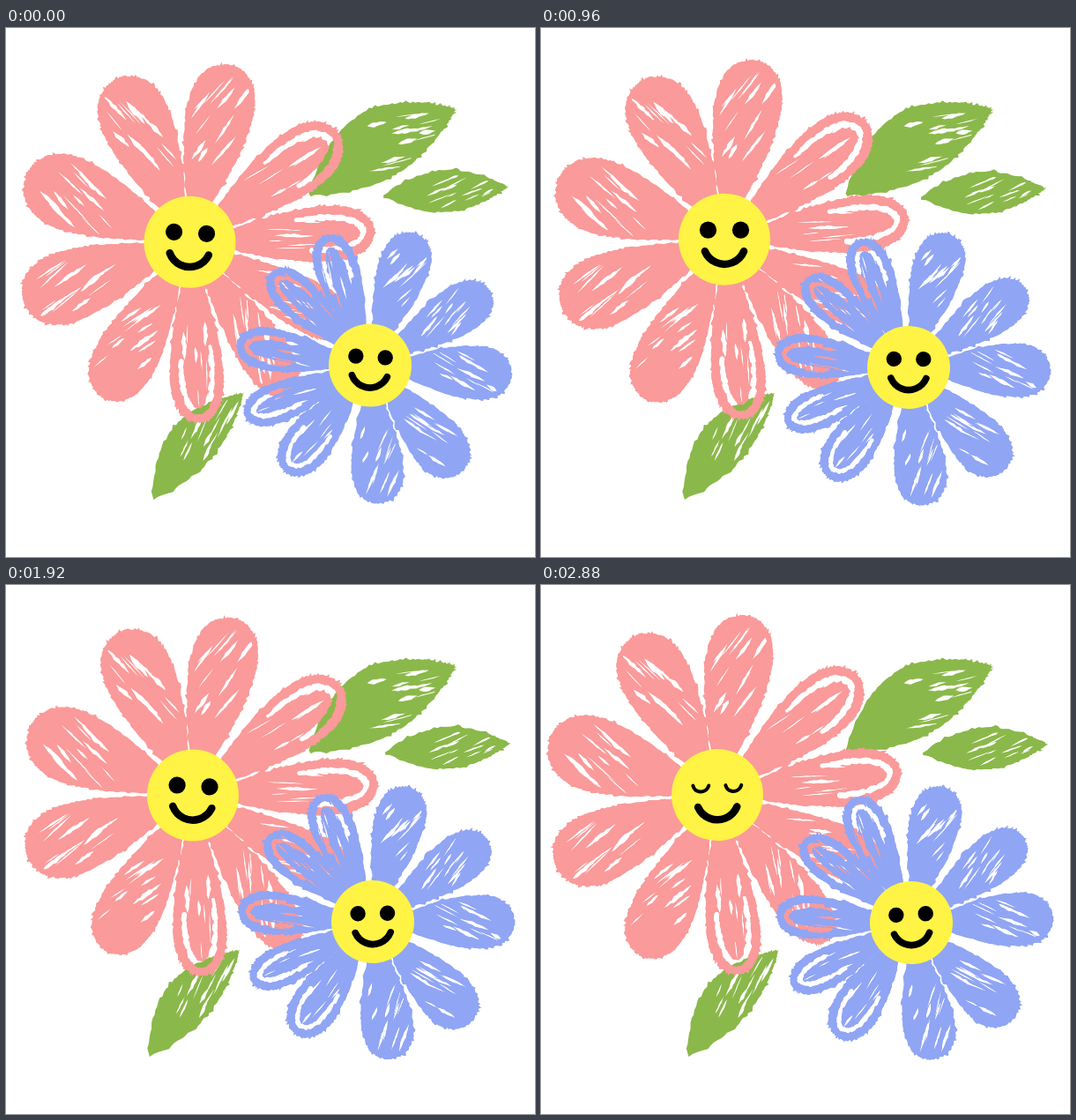
Animation of 600x600 px, one loop 2920 ms. Source, as an HTML page with a canvas:

```html
<!DOCTYPE html>
<html lang="en">
<head>
<meta charset="utf-8">
<title>Smiling flowers</title>
<style>
html, body { margin: 0; width: 100%; height: 100%; overflow: hidden; background: #fff; }
canvas { display: block; width: 600px; height: 600px; }
</style>
</head>
<body>
<canvas id="stage" width="600" height="600"></canvas>
<script>
const LOOP = 2920, STEP = 160, RAD = Math.PI / 180;
const YELLOW = '#fff346', GREEN = '#8bb84a';
const ctx = document.getElementById('stage').getContext('2d');

// Key points of the sway: one value for every second step
const sway = {
  pinkX: [208.5, 203, 205.5, 208, 212, 212, 212, 210, 210, 200],
  pinkTurn: [0, -1.5, -4.7, -3, -6.6, 1.3, 0, 2, -6.9, -3.8],
  blueX: [413, 422, 418, 417, 423.5, 422.5, 416, 421, 419, 420],
  blueY: [382.5, 383, 381.5, 385, 379.5, 379, 382, 377, 381, 383],
  blueTurn: [0, -5, -7.2, -2.5, -4.5, -2.8, -4, -5, -6.8, -5.8]
};

const pink = {
  color: '#fa9a9a', size: 1, len: 205,
  angles: [-77, -36.5, -3.5, 28.5, 56.5, 87, 119, 160, 202, 246],
  grooved: i => i === 1 || i === 2 || i === 5
};
const blue = {
  color: '#90a5f4', size: .904, len: 157,
  angles: [-71, -32, 4, 49.5, 86, 128.5, 158, 189, 223, 251],
  grooved: i => i > 4
};

let seed = 7;
function rnd() {
  seed = (seed + 0x6D2B79F5) | 0;
  let t = Math.imul(seed ^ (seed >>> 15), 1 | seed);
  t = (t + Math.imul(t ^ (t >>> 7), 61 | t)) ^ t;
  return ((t ^ (t >>> 14)) >>> 0) / 4294967296;
}
const between = (a, b) => a + (b - a) * rnd();

const petalProfile = t => 1.46 * Math.pow(t, .7) * Math.sqrt(Math.max(0, 1 - t ** 4));
const leafProfile = t => Math.pow(Math.max(0, Math.sin(Math.PI * t)), .85);

// A petal fills the room its neighbours leave; scribbles lean to alternate sides
function petals({ angles, len, grooved }) {
  const n = angles.length;
  return angles.map((angle, i) => {
    const next = i < n - 1 ? angles[i + 1] : angles[0] + 360;
    const prev = i > 0 ? angles[i - 1] : angles[n - 1] - 360;
    const w = len * .0048 * (next - prev) / 2;
    return {
      angle, len: len + len * .025 * Math.cos(angle * RAD), wl: w, wr: w,
      slant: grooved(i) ? 3 : i % 2 ? -18 : 25, streaks: grooved(i) ? 3 : 8,
      groove: grooved(i), start: 20, profile: petalProfile
    };
  });
}
const leaf = (angle, len, wl, wr, slant) => (
  { angle, len, wl, wr, slant, streaks: 9, start: 0, profile: leafProfile }
);

// s runs from the base (-1) along one side to the tip (0) and back to the base (1)
function edge(p, s, inset = 0, out = 0) {
  const t = 1 - s * s;
  const w = Math.max(1, (s < 0 ? p.wl : p.wr) - inset);
  return [
    p.start + (p.len - p.start - inset) * t + out * Math.cos(s * Math.PI / 2),
    Math.sign(s) * w * p.profile(t) + out * Math.sin(s * Math.PI / 2)
  ];
}

function outline(g, p, inset, rough) {
  const n = Math.round(p.len * .75);
  g.beginPath();
  for (let i = 0; i <= n; i++) {
    const bump = rnd() < .13 ? between(1.5, 3.2) : between(-1, 1);
    g.lineTo(...edge(p, i / n * 2 - 1, inset, rough ? bump : 0));
  }
  g.closePath();
}

function groove(g, p) {
  const inset = 6 + p.len * .034;
  let last = edge(p, -.65, inset);
  for (let s = -.625; s <= .6; s += .025) {
    const next = edge(p, s, inset, between(-1, 1));
    g.lineWidth = p.len * .034 * between(.45, 1.1);
    g.beginPath();
    g.moveTo(...last);
    g.lineTo(...next);
    g.stroke();
    last = next;
  }
}

// A ragged sliver, widest in the middle
function sliver(g, x, y, len, wide, turn) {
  g.save();
  g.translate(x, y);
  g.rotate(turn);
  g.beginPath();
  const n = Math.max(4, Math.round(len / 4));
  for (let i = 0; i <= 2 * n; i++) {
    const u = (i <= n ? i : 2 * n - i) / n;
    const h = wide / 2 * Math.sin(Math.PI * u) * between(.5, 1.3);
    g.lineTo((u - .5) * len, i <= n ? -h : h);
  }
  g.fill();
  g.restore();
}

function scratches(g, p) {
  const scale = p.len / 200;
  const total = p.streaks + 4;
  for (let i = 0; i < total; i++) {
    const bold = i < p.streaks;
    const t = between(.4, .86);
    const u = bold ? ((i + .5) / p.streaks * 2 - 1) * .7 : between(-.7, .7);
    const w = (u < 0 ? p.wl : p.wr) * p.profile(t);
    sliver(g, p.start + (p.len - p.start) * t, u * w,
      between(18, 45) * scale, bold ? between(2, 6) * scale : 1.4,
      (p.slant + between(-5, 5)) * RAD);
  }
}

function sprite(color, parts) {
  const c = document.createElement('canvas');
  c.width = c.height = 960;
  const g = c.getContext('2d');
  g.scale(2, 2);
  g.translate(240, 240);
  g.lineCap = 'round';
  for (const p of parts) {
    g.save();
    g.rotate(p.angle * RAD);
    g.fillStyle = color;
    outline(g, p, 0, true);
    g.fill();
    outline(g, p, 5, false);
    g.clip();
    g.globalCompositeOperation = 'destination-out';
    scratches(g, p);
    if (p.groove) groove(g, p);
    g.restore();
  }
  return c;
}

for (const f of [pink, blue]) f.art = sprite(f.color, petals(f));
const bigLeaf = sprite(GREEN, [leaf(-30.2, 192, 49, 30, 18)]);
const sideLeaf = sprite(GREEN, [leaf(-4, 141, 24, 24, -20)]);
const lowLeaf = sprite(GREEN, [leaf(-49.6, 157, 35, 20, -14)]);

function key(list, step) {
  const i = Math.floor(step / 2), next = Math.min(i + 1, list.length - 1);
  return list[i] + (list[next] - list[i]) * (step / 2 - i);
}

const wave = (step, period, peak = 0) => Math.cos(2 * Math.PI * (step - peak) / period);

function place(art, x, y) {
  ctx.drawImage(art, x - 240, y - 240, 480, 480);
}

function dot(x, y, r) {
  ctx.beginPath();
  ctx.arc(x, y, r, 0, 7);
  ctx.fill();
}

function curve(x, y, r, from, width) {
  ctx.lineWidth = width;
  ctx.beginPath();
  ctx.arc(x, y, r, from * RAD, (180 - from) * RAD);
  ctx.stroke();
}

function face(size, shut) {
  ctx.scale(size, size);
  ctx.fillStyle = YELLOW;
  dot(0, 0, 52);
  ctx.rotate(3 * RAD);
  ctx.fillStyle = ctx.strokeStyle = '#000';
  for (const x of [-18.5, 18.5]) {
    if (shut) curve(x, -13, 9.2, 14, 4);
    else dot(x, -10.5, 9.6);
  }
  curve(0, 4.2, 24, 23, 8.5);
}

function flower(f, x, y, turn, shut) {
  ctx.save();
  ctx.translate(x, y);
  ctx.rotate(turn * RAD);
  place(f.art, 0, 0);
  face(f.size, shut);
  ctx.restore();
}

function draw(ms) {
  const step = Math.floor((ms % LOOP) / STEP);
  const at = name => key(sway[name], step);
  const bx = at('blueX'), by = at('blueY');
  ctx.fillStyle = '#fff';
  ctx.fillRect(0, 0, 600, 600);
  place(bigLeaf, 345 + 2 * wave(step, 12, 8), 191 + 5 * wave(step, 6, 8));
  place(sideLeaf, 428 + (bx - 413) * .75, 190 + (by - 382.5) * .75);
  place(lowLeaf, 164 + 3 * wave(step, 9), 534.5);
  flower(pink, at('pinkX'), 237.8 + 5 * Math.exp(-step / 6), at('pinkTurn'), step % 14 === 4);
  flower(blue, bx, by, at('blueTurn'), step === 14);
}

ctx.lineCap = 'round';
const begin = performance.now();
function tick() {
  draw(performance.now() - begin);
  requestAnimationFrame(tick);
}
tick();
</script>
</body>
</html>
```
